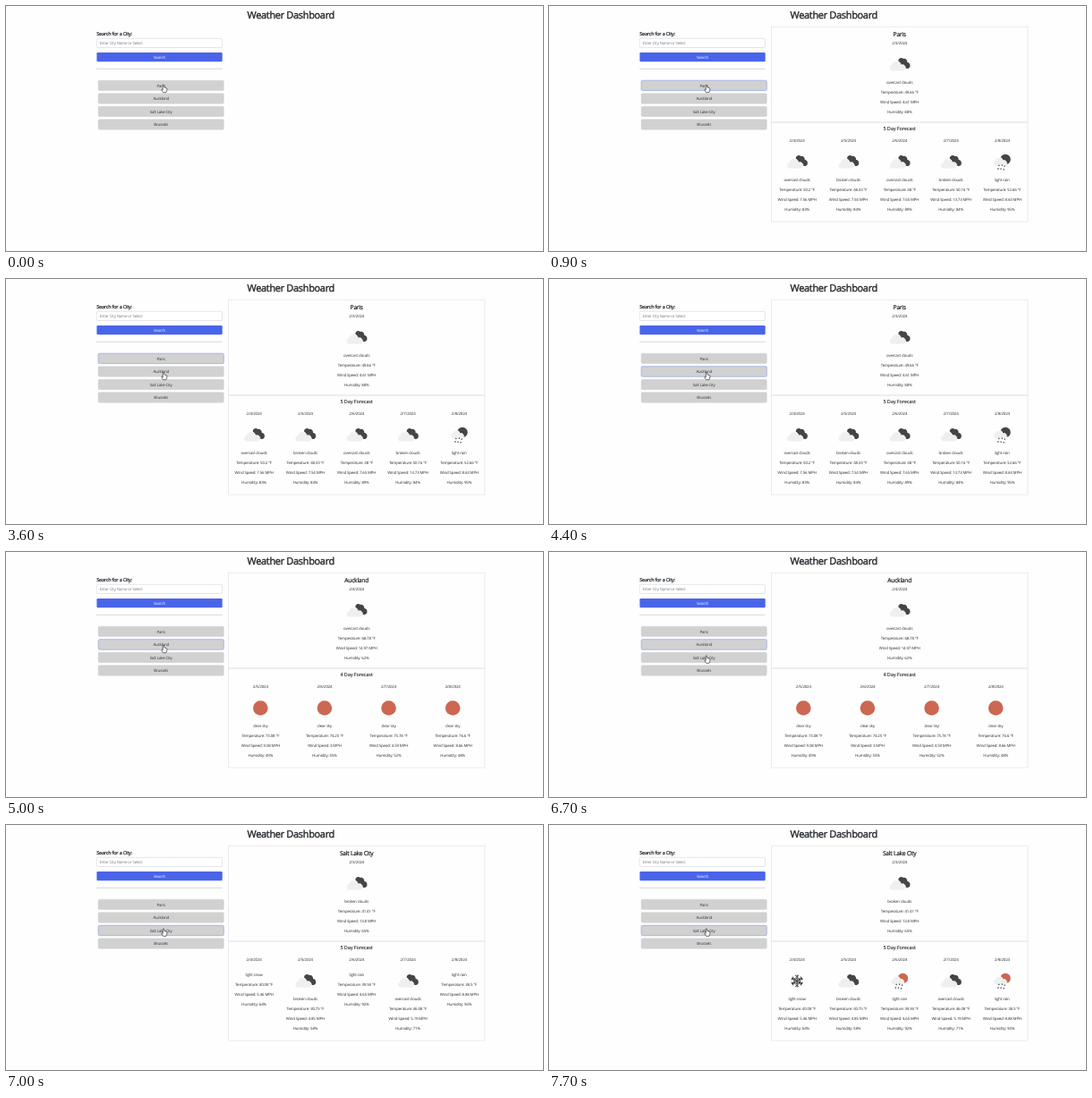
Write an HTML page that moves like this. It is 600 by 274 pixels and loops after 8000 ms.

```html
<!DOCTYPE html>
<html lang="en">
<head>
<meta charset="utf-8">
<title>Weather Dashboard</title>
<style>
html, body { margin: 0; width: 100%; height: 100%; overflow: hidden; background: #fefefe; }
svg { display: block; width: 600px; height: 274px; }
text { font: 4.4px "Open Sans", "Noto Sans", sans-serif; letter-spacing: -.035em; fill: #2b2e32; text-rendering: geometricPrecision; }
.mid { text-anchor: middle; }
.title, .label, .city { fill: #212529; stroke: #212529; stroke-width: .22; }
.title { font-size: 11px; letter-spacing: -.03em; stroke-width: .35; }
.label { font-size: 5.5px; }
.city { font-size: 6.7px; }
.sub { font-size: 5.55px; font-weight: 600; }
.hint { fill: #757a80; }
.white { fill: #fff; }
.card { fill: none; stroke: #e6e7ea; stroke-width: .8; }
.btn { fill: #d1d1d1; stroke: #c9c9ca; stroke-width: .4; }
.on { stroke: #a4b2e6; stroke-width: .9; }
</style>
</head>
<body>
<svg viewBox="0 0 600 274">
  <defs>
    <path id="cloud" d="M-8 7.5a3.5 3.5 0 0 1-.8-6.9A5.3 5.3 0 0 1 1.6.6 3.7 3.7 0 0 1 4.4 7.5Z" fill="#efefef"/>
    <g id="clouds">
      <path d="M-1.4-4.4A3.4 3.4 0 0 1 4.2-6.6 3.6 3.6 0 0 1 8.6-2.6 3.7 3.7 0 0 1 9.2 4.6H4L-1-2Z" fill="#454545"/>
      <use href="#cloud" stroke="#fefefe" stroke-width=".8"/>
    </g>
    <g id="rain">
      <use href="#cloud" transform="translate(-.5 -2.2) scale(.82)" stroke="#fefefe" stroke-width=".9"/>
      <path d="M-3.3 3.2l-.5 1.4M.2 3l-.5 1.4M3 4l-.5 1.4M-4.2 6.8l-.5 1.4M-1 7l-.5 1.4M2 7.6l-.5 1.4" stroke="#454545" stroke-width="1.2"/>
    </g>
    <g id="sunrain"><circle cx="3.6" cy="-3" r="5.8" fill="#cc6752"/><use href="#rain"/></g>
    <g id="nightrain"><circle cx="3.6" cy="-3" r="5.8" fill="#454545"/><use href="#rain"/></g>
    <circle id="sun" r="8.3" fill="#cc6752"/>
    <path id="arm" d="M0 0V-7M-2-6.4 0-4.6 2-6.4M-1.8-3.8 0-2.2 1.8-3.8" fill="none" stroke="#3c3c3c" stroke-width="1"/>
    <g id="snow"></g>
  </defs>
  <text class="mid title" x="318.3" y="14.3">Weather Dashboard</text>
  <text class="label" x="101.2" y="32.9">Search for a City:</text>
  <rect x="101.3" y="36.3" width="140.2" height="10.2" rx="1.4" fill="#fff" stroke="#d3d6da" stroke-width=".6"/>
  <text class="hint" x="104.5" y="42.9">Enter City Name or Select</text>
  <rect x="101.4" y="52.1" width="140.3" height="10.1" rx="1.2" fill="#4964e9"/>
  <text class="mid white" x="171.5" y="58.7">Search</text>
  <path d="M101 70.3H241.7" stroke="#c9cacc" stroke-width=".7"/>
  <g id="buttons"></g>
  <g id="panel"></g>
  <path id="hand" d="M175.3 88.4q.8-.6 1.3.3l.5 2.4 2 .5q.9.3.8 1.3l-.3 2-.8 1.8h-3.2l-1.7-2.6q-.4-.8.4-.9l1 .5Z" fill="#fff" stroke="#26282c" stroke-width=".65" stroke-linejoin="round"/>
</svg>
<script>
const $ = id => document.getElementById(id);
const LOOP = 8000;
const cities = ["Paris", "Auckland", "Salt Lake City", "Brussels"];

// Each day: description, icon, temperature, wind, humidity
const reports = [
  { day: 3, now: ["overcast clouds", "clouds", 49.66, 4.61, 88], next: [
    ["overcast clouds", "clouds", 50.2, 7.56, 83],
    ["broken clouds", "clouds", 48.33, 7.54, 84],
    ["overcast clouds", "clouds", 48, 7.65, 89],
    ["broken clouds", "clouds", 50.16, 13.73, 84],
    ["light rain", "nightrain", 52.66, 8.63, 95]] },
  { day: 4, now: ["overcast clouds", "clouds", 68.78, 14.97, 62], next: [
    ["clear sky", "sun", 73.08, 9.08, 49],
    ["clear sky", "sun", 74.25, 3, 55],
    ["clear sky", "sun", 75.78, 4.59, 52],
    ["clear sky", "sun", 76.6, 8.66, 48]] },
  { day: 3, now: ["broken clouds", "clouds", 41.41, 13.8, 65], next: [
    ["light snow", "snow", 40.08, 5.46, 64],
    ["broken clouds", "clouds", 40.75, 4.85, 58],
    ["light rain", "sunrain", 39.94, 4.65, 92],
    ["overcast clouds", "clouds", 46.08, 5.19, 71],
    ["light rain", "sunrain", 38.5, 8.88, 94]] }
];

const text = (x, y, s, cls = "") => `<text class="mid ${cls}" x="${x}" y="${y}">${s}</text>`;

function dayView(x, y, day, [sky, icon, temp, wind, wet], loaded) {
  const shown = loaded || icon === "clouds";
  const lines = [sky, `Temperature: ${temp} °F`, `Wind Speed: ${wind} MPH`, `Humidity: ${wet}%`];
  const top = y + (shown ? 44.5 : 17.5);
  return text(x, y, `2/${day}/2024`) +
    (shown ? `<use href="#${icon}" x="${x}" y="${y + 22.8}"/>` : "") +
    lines.map((s, i) => text(x, top + i * 10.8, s)).join("");
}

function panelView(city, loaded) {
  if (city < 0) return "";
  const { day, now, next } = reports[city];
  const step = 286.5 / next.length;
  return `<rect class="card" x="248.5" y="23.2" width="286.5" height="106.5"/>
    <rect class="card" x="248.5" y="130.3" width="286.5" height="110.8"/>` +
    text(391.7, 34.2, cities[city], "city") +
    dayView(391.7, 42.7, day, now, true) +
    text(391.7, 139.2, `${next.length} Day Forecast`, "sub") +
    next.map((d, i) => dayView(248.5 + step * (i + .5), 151.7, day + 1 + i, d, loaded)).join("");
}

const buttonsView = focus => cities.map((name, i) => {
  const y = 83.2 + i * 14.55;
  return `<rect class="btn ${i === focus ? "on" : ""}" x="103.1" y="${y}" width="140.2" height="11.4" rx="1.4"/>` +
    text(173.2, y + 7.4, name);
}).join("");

// Last value whose start time has passed
const at = (t, steps) => steps.filter(s => s[0] <= t).pop()[1];

let last = "";
function draw(ms) {
  const t = ms % LOOP;
  const focus = at(t, [[0, -1], [700, 0], [4400, 1], [6800, 2]]);
  const city = at(t, [[0, -1], [800, 0], [4500, 1], [6900, 2]]);
  const handY = at(t, [[0, 0], [3600, 16], [6300, 27.6]]);
  const loaded = city < 2 || t >= 7100;
  const key = [focus, city, handY, loaded].join();
  if (key !== last) {
    last = key;
    $("buttons").innerHTML = buttonsView(focus);
    $("panel").innerHTML = panelView(city, loaded);
    $("hand").setAttribute("transform", `translate(0 ${handY})`);
  }
}

$("snow").innerHTML = [0, 60, 120, 180, 240, 300].map(a => `<use href="#arm" transform="rotate(${a})"/>`).join("");

const start = performance.now();
function frame() {
  draw(performance.now() - start);
  requestAnimationFrame(frame);
}
frame();
</script>
</body>
</html>
```
